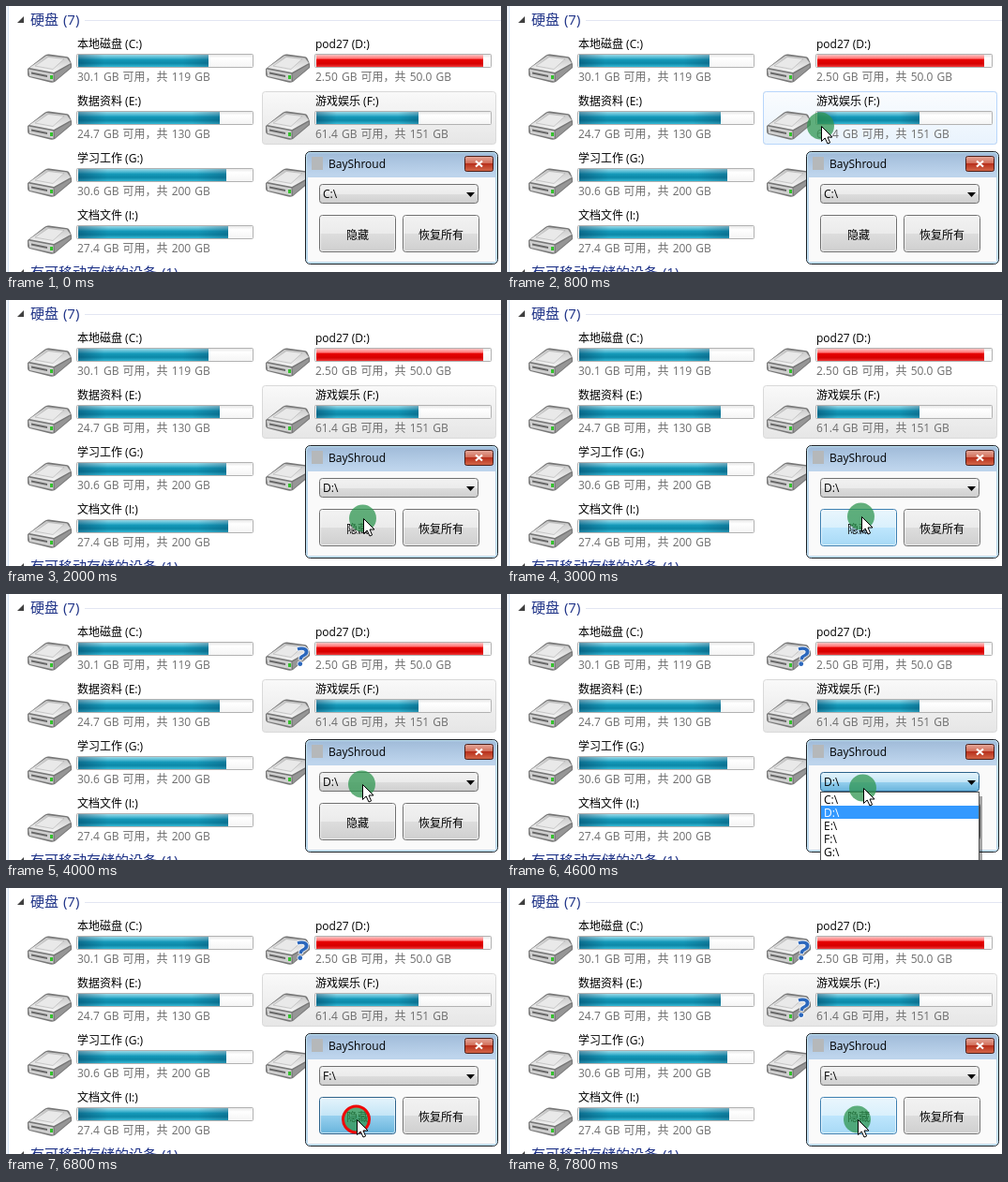
Write an HTML page that moves like this. It is 528 by 284 pixels and loops after 8 s.

```html
<!DOCTYPE html>
<html lang="zh">
<head>
<meta charset="utf-8">
<style>
html, body { margin: 0; width: 100%; height: 100%; overflow: hidden; background: #fff; }
svg { display: block; }
text { font: 12px "Open Sans", "Noto Sans CJK SC", "Noto Sans CJK", sans-serif; }
.head { font-size: 15px; fill: #1e3287; word-spacing: 1px; }
.info { font-family: "Open Sans", "Noto Sans CJK TC", "Noto Sans CJK", sans-serif; fill: #6d6d6d; word-spacing: 1px; }
.mark { font-size: 28px; font-weight: 700; fill: #2c68bd; stroke: #fff; stroke-width: 1.5px; paint-order: stroke; }
.mid { text-anchor: middle; }
</style>
</head>
<body>
<svg width="528" height="284" viewBox="0 0 528 284">
  <defs id="defs"></defs>
  <g id="scene"></g>
</svg>
<script>
const LOOP = 8000, STEP = 200;

const gradients = {
  teal: '0 #9ad8e6 .25 #4bb8d2 .42 #1599b9 .7 #0c88a7 1 #35b9d6',
  red: '0 #ffc4c4 .3 #f77 .42 #e60000 .75 #d60000 1 #f03a3a',
  track: '0 #e4e4e4 .3 #fff 1 #f4f4f4',
  picked: '0 #f9f9f9 1 #e6e6e6',
  hover: '0 #fafcfe 1 #e9f3fd',
  normal: '0 #f2f2f2 .5 #ebebeb .5 #ddd 1 #cfcfcf',
  hot: '0 #eaf6fd .5 #d9f0fc .5 #bee6fd 1 #a7d9f5',
  pressed: '0 #e5f4fc .5 #c4e5f6 .5 #98d1ef 1 #68b3db',
  title: '0 #9fbad8 .2 #bdd4ec 1 #bdd4ec',
  close: '0 #e6a99b .45 #d2705c .5 #b8301c 1 #d4694a',
  lid: '0 #c4c4c4 1 #f6f6f6'
};
const borders = { normal: '#707070', hot: '#3c7fb1', pressed: '#2c628b' };

document.getElementById('defs').innerHTML = Object.entries(gradients).map(([id, spec]) => {
  const s = spec.split(' ');
  let stops = '';
  for (let i = 0; i < s.length; i += 2) stops += `<stop offset="${s[i]}" stop-color="${s[i + 1]}"/>`;
  return `<linearGradient id="${id}" x2="0" y2="1">${stops}</linearGradient>`;
}).join('') + '<linearGradient id="shade"><stop stop-color="#024" stop-opacity=".35"/>' +
  '<stop offset=".2" stop-color="#024" stop-opacity="0"/><stop offset=".8" stop-color="#024" stop-opacity="0"/>' +
  '<stop offset="1" stop-color="#024" stop-opacity=".25"/></linearGradient>';

const rect = (x, y, w, h, fill, more = '') =>
  `<rect x="${x}" y="${y}" width="${w}" height="${h}" fill="${fill}" ${more}/>`;
const frame = (x, y, w, h, fill, stroke, r = 0) =>
  rect(x + .5, y + .5, w - 1, h - 1, fill, `stroke="${stroke}" rx="${r}"`);
const text = (x, y, s, cls = '', more = '') => `<text x="${x}" y="${y}" class="${cls}" ${more}>${s}</text>`;
const path = (d, fill, more = '') => `<path d="${d}" fill="${fill}" ${more}/>`;

// column, row, name, info, width of the filled bar
const disks = [
  [0, 0, '本地磁盘 (C:)', '30.1 GB 可用，共 119 GB', 139],
  [1, 0, 'pod27 (D:)', '2.50 GB 可用，共 50.0 GB', 178],
  [0, 1, '数据资料 (E:)', '24.7 GB 可用，共 130 GB', 151],
  [1, 1, '游戏娱乐 (F:)', '61.4 GB 可用，共 151 GB', 109],
  [0, 2, '学习工作 (G:)', '30.6 GB 可用，共 200 GB', 158],
  [1, 2, '', '', 0],
  [0, 3, '文档文件 (I:)', '27.4 GB 可用，共 200 GB', 160]
];

const driveIcon =
  path('M23 67L41 53Q43 51 46 51.5L64 54Q67 54 68 57L70 62V66L52 81Q50 82 47 81.5L25 76Q23 75 23 73Z', '#777') +
  path('M25 66L43 53L65 55.5L69 61L51 71Z', 'url(#lid)') +
  path('M31 64L45 54.5L62 56.5L50 67.5Z', '#e9e9e9', 'stroke="#b0b0b0" stroke-width=".6"') +
  path('M24 67.5L50.5 72.5V80.5L25 75Z', '#cfcfcf') +
  path('M27 70.5L44 74V76L27 72.5Z', '#666') +
  path('M51.5 72.5L69 62.5V65.5L52 80Z', '#969696') +
  rect(47, 74, 3, 4, '#35c02e');

function disk([col, row, name, info, used], marked) {
  const bar = name && text(76, 45, name) + text(76, 80, info, 'info') +
    frame(75, 51, 189, 15, 'url(#track)', '#b2b2b2', 1) +
    rect(77, 52, used, 13, `url(#${name.includes('D:') ? 'red' : 'teal'})`) +
    (name.includes('D:') ? '' : rect(77, 52, used, 13, 'url(#shade)'));
  const mark = marked ? text(55, 77, '?', 'mark', 'transform="rotate(8 63 67)"') : '';
  return `<g transform="translate(${col * 254} ${row * 61})">${driveIcon}${bar}${mark}</g>`;
}

const tile = (col, row, fill, stroke) =>
  frame(19 + col * 254, 30 + row * 61, 250, 57, `url(#${fill})`, stroke, 3);

const header = (y, s) => path(`M19 ${y - 9}v7h-7z`, '#404040') + text(26, y, s, 'head');

const button = (x, s, state) =>
  frame(x, 223, 82, 40, `url(#${state})`, borders[state], 3) +
  frame(x + 1, 224, 80, 38, 'none', 'rgba(255,255,255,.6)', 2) +
  text(x + 41, 249, s, 'mid');

const windowFrame =
  frame(319, 155, 206, 121, 'url(#title)', '#1b1f24', 5) +
  frame(320, 156, 204, 119, 'none', '#c5e8f8', 4) +
  rect(322, 183, 200, 90, '#fafafa') +
  rect(326, 161, 12, 14, '#b5b8ba') +
  text(344, 173, 'BayShroud') +
  frame(489, 160, 31, 17, 'url(#close)', '#4c1f1a', 2) +
  path('M501 165.5l7 6m0-6l-7 6', 'none', 'stroke="#fff" stroke-width="2.2"');

function combo(letter, open) {
  const state = open ? 'pressed' : 'normal';
  return frame(334, 190, 170, 21, `url(#${state})`, borders[state], 3) +
    text(338, 205, letter + ':\\') + path('M491 199h9l-4.5 5z', '#000');
}

function list(selected) {
  let s = rect(504, 216, 3, 70, '#000', 'opacity=".35"') + frame(334, 211, 170, 80, '#fff', '#555');
  [...'CDEFG'].forEach((c, i) => {
    const on = c === selected;
    if (on) s += rect(335, 212 + 14 * i, 168, 14, '#39f');
    s += text(338, 224 + 14 * i, c + ':\\', '', on ? 'fill="#fff"' : '');
  });
  return s;
}

const pointer = (x, y, click) => `<g transform="translate(${x} ${y})">` +
  '<circle cx="-.5" r="14.5" fill="#2f9650" opacity=".75"/>' +
  (click ? '<circle cx="-.5" r="14" fill="none" stroke="#f00808" stroke-width="3"/>' : '') +
  path('M.5 .5V16.5L4.2 13L7 19L9.6 17.9L7 12H12Z', '#fff', 'stroke="#000"') + '</g>';

// step: pointer position, 1 = click ring
const moves = {
  2: [130, 185], 3: [230, 135], 4: [335, 128], 5: [378, 186], 6: [386, 204, 1], 7: [386, 204],
  8: [383, 226], 9: [381, 233, 1], 10: [381, 233], 11: [380, 237], 12: [379, 233], 13: [379, 232, 1],
  14: [379, 232], 15: [378, 231],
  19: [379, 216], 20: [380, 203], 21: [380, 199], 22: [380, 203, 1], 23: [380, 207], 24: [378, 228],
  25: [377, 234], 26: [376, 240], 27: [375, 245],
  29: [375, 246], 30: [375, 256], 31: [375, 259, 1], 32: [375, 257], 33: [374, 250], 34: [374, 247, 1], 35: [374, 247]
};

function render(n) {
  const within = (a, b) => n >= a && n < b;
  let k = n;
  while (k > 1 && !moves[k]) k--;
  const at = moves[k];
  const letter = n < 10 ? 'C' : n < 32 ? 'D' : 'F';
  const open = within(6, 10) || within(22, 32);
  const over = at && at[1] >= 212 ? 'CDEFG'[Math.floor((at[1] - 212) / 14)] : letter;
  const hide = n === 13 || n === 34 ? 'pressed'
    : within(11, 19) || n > 32 ? 'hot' : 'normal';

  let s = rect(0, 0, 2, 284, '#f1f5fb') + rect(2, 0, 1, 284, '#d6e5f5') +
    rect(84, 15, 444, 1, '#e2e6f2') + header(20, '硬盘 (7)') + header(290, '有可移动存储的设备 (1)') +
    tile(1, 1, 'picked', '#d9d9d9');
  if (at && n < 5) s += tile(at[0] > 272 ? 1 : 0, Math.floor((at[1] - 30) / 61), 'hover', '#b8d6fb');
  s += disks.map((d, i) => disk(d, i === 1 && n >= 17 || i === 3 && n >= 38)).join('');
  s += windowFrame + combo(letter, open) + button(334, '隐藏', hide) + button(423, '恢复所有', 'normal');
  if (open) s += list(over);
  if (at) s += pointer(...at);
  document.getElementById('scene').innerHTML = s;
}

let shown = -1;
function tick() {
  const n = Math.floor(performance.now() % LOOP / STEP);
  if (n !== shown) render(shown = n);
  requestAnimationFrame(tick);
}
tick();
</script>
</body>
</html>
```
